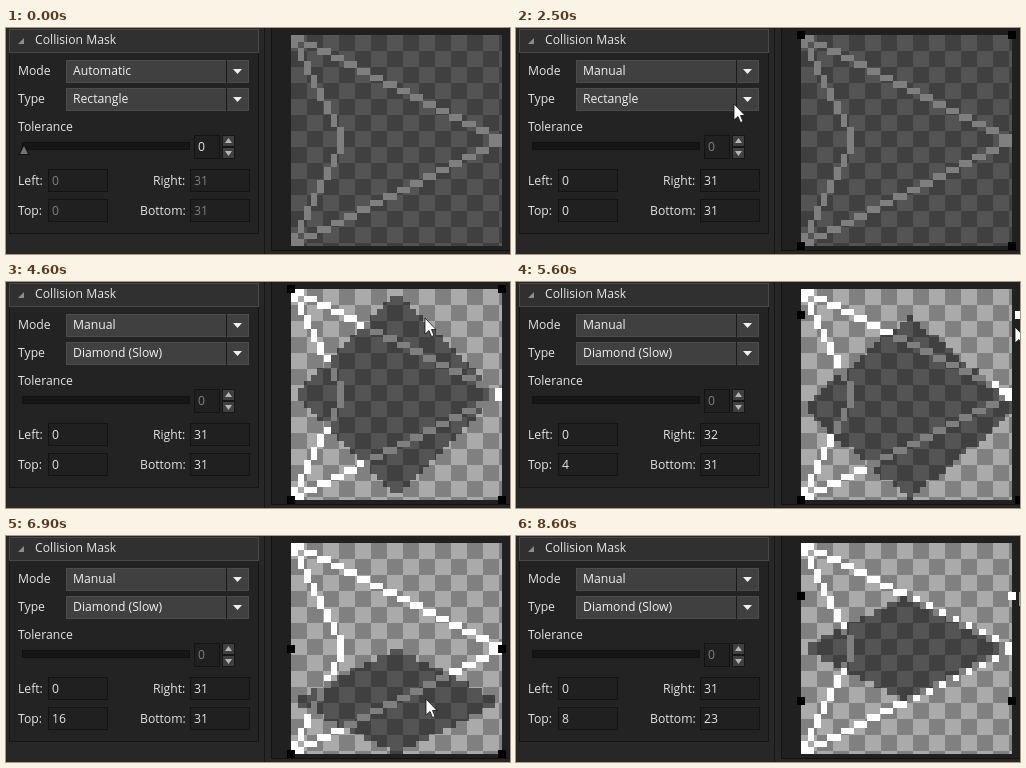
Write an HTML page with a canvas that moves like this. It is 504 px wide and 226 px high and loops after 8700 ms.

```html
<!DOCTYPE html>
<html lang="en">
<head>
<meta charset="utf-8">
<title>Collision Mask</title>
<style>
html, body { margin: 0; width: 100%; height: 100%; overflow: hidden; background: #242424; }
canvas { display: block; }
</style>
</head>
<body>
<canvas id="stage" width="504" height="226"></canvas>
<script>
const ctx = document.getElementById('stage').getContext('2d', { alpha: false });
const LOOP = 8700, STEP = 100;
const SIZE = 32, LEFT = 285, TOP = 7, EXTENT = 211, SCALE = EXTENT / SIZE;
const MODES = ['Automatic', 'Full Image', 'Manual'];
const TYPES = ['Rectangle', 'Rectangle with rotation', 'Ellipse (Slow)',
  'Diamond (Slow)', 'Precise (Slow)', 'Precise Per Frame (Slow)'];

// Moments of the clicks and drags.
const ENTER = 100, OPEN_MODE = 800, PICK_MODE = 1900, OPEN_TYPE = 2600, PICK_TYPE = 3700;
const RESIZE = 4900, RESIZE_END = 6500, MOVE = 7200, MOVE_END = 7900;

// Waypoints of the mouse; everything dragged follows it.
const path = [
  { t: ENTER, x: 212, y: 196 },
  { t: OPEN_MODE, x: 236, y: 45 },
  { t: 1400, x: 165, y: 79 },
  { t: PICK_MODE, x: 150, y: 97 },
  { t: OPEN_TYPE, x: 229, y: 73 },
  { t: 3400, x: 157, y: 133 },
  { t: PICK_TYPE, x: 155, y: 140 },
  { t: 4600, x: 419, y: 36 },
  { t: RESIZE, x: 494, y: 8 },
  { t: 5500, x: 499, y: 44 },
  { t: 6200, x: 499, y: 48 },
  { t: RESIZE_END, x: 494, y: 122 },
  { t: 6900, x: 420, y: 163 },
  { t: MOVE, x: 420, y: 163 },
  { t: MOVE_END, x: 421, y: 110 },
  { t: 8600, x: 503, y: 55 }
];

const clamp = (v, lo, hi) => Math.min(hi, Math.max(lo, v));

function mouseAt(time) {
  const t = clamp(time, path[0].t, path[path.length - 1].t);
  const i = Math.max(1, path.findIndex(p => p.t >= t));
  const a = path[i - 1], b = path[i];
  const k = (t - a.t) / (b.t - a.t);
  return { x: a.x + (b.x - a.x) * k, y: a.y + (b.y - a.y) * k };
}

function maskAt(t) {
  const grip = mouseAt(clamp(t, RESIZE, RESIZE_END));
  const moved = mouseAt(clamp(t, MOVE, MOVE_END)).y - mouseAt(MOVE).y;
  const shift = Math.round(moved / SCALE);
  return {
    top: Math.max(0, Math.round((grip.y - TOP - 11) / SCALE)) + shift,
    right: Math.round((grip.x - LEFT) / SCALE - 0.5),
    bottom: SIZE - 1 + shift
  };
}

function rect(x, y, w, h, color) {
  ctx.fillStyle = color;
  ctx.fillRect(x, y, w, h);
}

function box(x, y, w, h, fill, border) {
  rect(x, y, w, h, border);
  rect(x + 1, y + 1, w - 2, h - 2, fill);
}

function text(str, x, y, color = '#e4e4e4') {
  ctx.fillStyle = color;
  ctx.fillText(str, x, y);
}

function polygon(points, color) {
  ctx.beginPath();
  points.forEach(([x, y]) => ctx.lineTo(x, y));
  ctx.closePath();
  ctx.fillStyle = color;
  ctx.fill();
}

function triangle(cx, y, halfWidth, height, color) {
  polygon([[cx - halfWidth, y], [cx + halfWidth, y], [cx, y + height]], color);
}

function combo(label, value, y) {
  text(label, 12, y + 15);
  box(60, y, 183, 23, '#404040', '#4c4c4c');
  rect(220, y, 1, 23, '#1a1a1a');
  text(value, 67, y + 15, '#f0f0f0');
  triangle(231.5, y + 9, 4.5, 5, '#f0f0f0');
}

function field(label, value, labelX, x, y, enabled) {
  text(label, labelX, y + 16);
  box(x, y, 60, 23, '#202020', '#131313');
  text(value, x + 4, y + 16, enabled ? '#e4e4e4' : '#808080');
}

function list(items, y, mouse) {
  const hover = mouse.x < 225 ? Math.floor((mouse.y - y - 3) / 16) : -1;
  rect(61, y, 183, items.length * 16 + 5, '#101010');
  items.forEach((item, i) => {
    const rowY = y + 3 + i * 16;
    if (i === hover) rect(63, rowY, 178, 16, '#87919d');
    else if (i === 0) rect(63, rowY, 178, 16, '#5c6674');
    text(item, 63, rowY + 12, '#f8f8f8');
  });
}

function panel(mask, manual, type) {
  rect(0, 0, 504, 226, '#272727');
  rect(258, 0, 1, 226, '#161616');
  box(3, 1, 250, 205, '#232323', '#141414');
  box(3, 1, 250, 24, '#303030', '#484848');
  polygon([[12, 16], [18, 16], [18, 10]], '#8c8c8c');
  text('Collision Mask', 29, 16);

  combo('Mode', MODES[manual ? 2 : 0], 32);
  combo('Type', type, 60);

  text('Tolerance', 12, 103);
  box(16, 114, 168, 8, '#161616', '#111');
  if (!manual) {
    triangle(18, 127, 6, -11, '#111');
    triangle(18, 126, 4, -8, '#747474');
  }
  box(188, 107, 26, 24, '#202020', '#131313');
  text('0', 192, 123, manual ? '#808080' : '#e4e4e4');
  box(216, 107, 13, 12, '#404040', '#151515');
  box(216, 119, 13, 12, '#404040', '#151515');
  triangle(222.5, 115, 3.5, -5, '#b5b5b5');
  triangle(222.5, 123, 3.5, 5, '#b5b5b5');

  field('Left:', 0, 12, 42, 141, manual);
  field('Right:', mask.right, 147, 184, 141, manual);
  field('Top:', mask.top, 12, 42, 171, manual);
  field('Bottom:', mask.bottom, 134, 184, 171, manual);
}

const edge = n => Math.round(n * SCALE);

function pixel(x, y, color) {
  rect(LEFT + edge(x), TOP + edge(y), edge(x + 1) - edge(x), edge(y + 1) - edge(y), color);
}

function arrowhead() {
  const mirrored = (x, y) => {
    pixel(x, y, '#fff');
    pixel(x, SIZE - 1 - y, '#fff');
  };
  for (let x = 0; x < SIZE; x++) mirrored(x, x >> 1);
  for (let y = 0; y < SIZE / 2; y++) mirrored(y >> 1, y);
}

function diamond({ top, right, bottom }) {
  const rx = (right + 1) / 2, ry = (bottom + 1 - top) / 2;
  for (let y = 0; y < SIZE; y++)
    for (let x = 0; x < SIZE; x++) {
      const distance = Math.abs(x + 0.5 - rx) / rx + Math.abs(y + 0.5 - top - ry) / ry;
      if (distance < 1) pixel(x, y, 'rgba(0,0,0,.5)');
    }
}

function handles(mask, mouse) {
  for (const col of [0, mask.right + 1])
    for (const row of [mask.top, mask.bottom + 1]) {
      const x = LEFT + edge(col), y = TOP + edge(row);
      const hovered = Math.hypot(mouse.x - x, mouse.y - y) < 14;
      rect(x - 4, y - 4, 8, 8, hovered ? '#fff' : '#000');
    }
}

function preview(mask, isDiamond) {
  box(265, -1, 240, 224, '#202020', '#131313');
  ctx.save();
  ctx.beginPath();
  ctx.rect(LEFT, TOP, EXTENT, EXTENT);
  ctx.clip();
  for (let row = 0; row < 14; row++)
    for (let col = 0; col < 14; col++)
      rect(LEFT + col * 16, TOP + row * 16, 16, 16, (row + col) % 2 ? '#808080' : '#aaa');
  arrowhead();
  if (isDiamond) diamond(mask);
  else rect(LEFT, TOP, EXTENT, EXTENT, 'rgba(0,0,0,.5)');
  ctx.restore();
}

function cursor({ x, y }) {
  ctx.save();
  ctx.translate(Math.round(x), Math.round(y));
  polygon([[0, 0], [0, 16], [4, 12.5], [6.5, 18.5], [9, 17.5], [6.5, 11.5], [11, 11.5]], '#fff');
  ctx.lineWidth = 0.8;
  ctx.strokeStyle = '#111';
  ctx.stroke();
  ctx.restore();
}

function draw(t) {
  const mouse = mouseAt(t), mask = maskAt(t);
  const manual = t >= PICK_MODE, isDiamond = t >= PICK_TYPE;

  ctx.font = '12.2px "Open Sans", "Noto Sans", sans-serif';
  panel(mask, manual, TYPES[isDiamond ? 3 : 0]);
  preview(mask, isDiamond);
  if (manual) handles(mask, mouse);
  if (t >= OPEN_MODE && t < PICK_MODE) list(MODES, 55, mouse);
  if (t >= OPEN_TYPE && t < PICK_TYPE) list(TYPES, 83, mouse);
  if (t >= ENTER) cursor(mouse);
}

function frame(now) {
  draw(Math.floor(now % LOOP / STEP) * STEP);
  requestAnimationFrame(frame);
}
requestAnimationFrame(frame);
</script>
</body>
</html>
```
